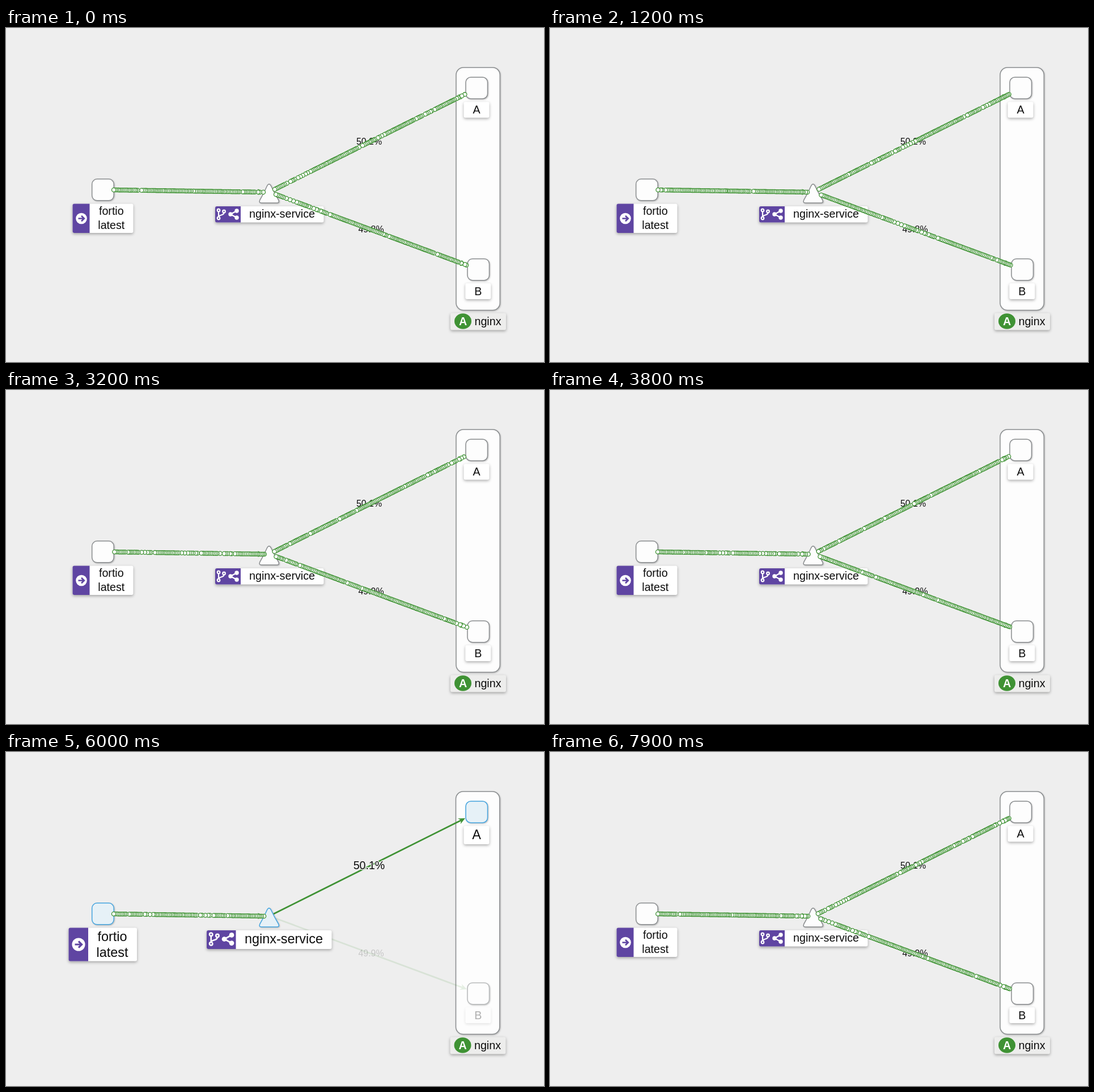
An HTML page that plays this animation: 949 by 590 pixels, repeating every 8000 ms.

```html
<!DOCTYPE html>
<html lang="en">
<head>
<meta charset="utf-8">
<title>Traffic graph</title>
<style>
  html, body { margin: 0; width: 100%; height: 100%; overflow: hidden; background: #eee; }
  svg { display: block; }
  text { font-family: "Liberation Sans", Arial, sans-serif; text-anchor: middle; fill: #0c0c0c; }
  .card { filter: drop-shadow(0 2px 2.5px rgba(0, 0, 0, .32)); }
  .node { filter: drop-shadow(1px 1.5px 1px rgba(0, 0, 0, .25)); stroke-width: 1.5; stroke-linejoin: round; }
  .rate { paint-order: stroke; stroke: #eee; stroke-width: 3px; stroke-linejoin: round; }
  .dot { fill: #fff; stroke: #3f9234; stroke-width: 1.3; }
</style>
</head>
<body>
<svg width="949" height="590" viewBox="0 0 949 590">
  <g id="scene"></g>
  <g id="dots"></g>
</svg>
<script>
const LOOP = 8000, SPEED = 0.1, TRACK = LOOP * SPEED;
const GREEN = '#3f9234', PURPLE = '#5f45a2', GRAY = '#8a8d8f', BLUE = '#45a5e0';
const scene = document.getElementById('scene');
const dotLayer = document.getElementById('dots');

function random(seed) {
  return () => {
    seed = (seed * 1664525 + 1013904223) >>> 0;
    return seed / 4294967296;
  };
}

// Distances between emitted dots: mostly packed, sometimes loose.
function emissions(seed) {
  const rnd = random(seed), list = [];
  let loose = false;
  for (let x = 0; x < TRACK;) {
    list.push(x);
    if (rnd() < 0.13) loose = !loose;
    x += loose && rnd() < 0.4 ? 4 + rnd() * 3.2 : 2.3 + rnd() * 0.8;
    if (loose && rnd() < 0.3) loose = false;
  }
  return list;
}

function makeFlow(seed) {
  const group = document.createElementNS('http://www.w3.org/2000/svg', 'g');
  dotLayer.append(group);
  const offsets = emissions(seed);
  const pool = [];
  for (let i = 0; i < 190; i++) {
    const c = document.createElementNS('http://www.w3.org/2000/svg', 'circle');
    c.setAttribute('class', 'dot');
    c.setAttribute('r', 3.6);
    group.append(c);
    pool.push(c);
  }
  return { group, offsets, pool };
}

const flows = { in: makeFlow(11), A: makeFlow(47), B: makeFlow(83) };

function edges(fresh) {
  return {
    in: [190, 286, 456, 290],
    A: fresh ? [472, 286, 810, 117] : [474, 285, 810, 117],
    B: [476, 294, 813, 419]
  };
}

function drawFlow(flow, [x1, y1, x2, y2], t, shown) {
  flow.group.style.display = shown ? '' : 'none';
  if (!shown) return;
  const dx = x2 - x1, dy = y2 - y1, len = Math.hypot(dx, dy);
  // Newest dots are painted last, on top.
  const places = flow.offsets
    .map(o => (o + SPEED * t) % TRACK)
    .filter(p => p <= len)
    .sort((a, b) => b - a);
  flow.pool.forEach((c, i) => {
    const p = places[i];
    c.style.display = p === undefined ? 'none' : '';
    if (p === undefined) return;
    c.setAttribute('cx', (x1 + dx * p / len).toFixed(2));
    c.setAttribute('cy', (y1 + dy * p / len).toFixed(2));
  });
}

const rect = (x, y, w, h, r, fill, extra = '') =>
  `<rect x="${x}" y="${y}" width="${w}" height="${h}" rx="${r}" fill="${fill}" ${extra}/>`;
const text = (s, x, y, size, extra = '') =>
  `<text x="${x}" y="${y}" font-size="${size}" ${extra}>${s}</text>`;
const fade = (on, amount, body) => `<g opacity="${on ? amount : 1}">${body}</g>`;

function edge([x1, y1, x2, y2], dim) {
  const angle = Math.atan2(y2 - y1, x2 - x1) * 180 / Math.PI;
  const len = Math.hypot(x2 - x1, y2 - y1);
  return fade(dim, 0.12, `<g transform="translate(${x1} ${y1}) rotate(${angle})">
    <path d="M0 0H${len - 5}" stroke="${GREEN}" stroke-width="2.8"/>
    <path d="M${len} 0l-12 -5.5 4 5.5 -4 5.5z" fill="${GREEN}"/></g>`);
}

function look(lit, dim) {
  return `class="node" stroke="${lit ? BLUE : dim ? '#b9bbbc' : GRAY}"`;
}
const tone = lit => lit ? '#e6f1f7' : '#fdfdfd';
const square = (x, y, lit, dim) => rect(x, y, 38.5, 38, 9, tone(lit), look(lit, dim));

function triangle(lit) {
  return `<path d="M460.5 279Q464 272.5 467.5 279Q473.500 292 480.500 303.500Q483 309 478 309H450.500Q445.500 309 448 303.500Q455 292 460.500 279Z"
    fill="${tone(lit)}" ${look(lit)}/>`;
}

const arrowIcon = (x, y, k) => `<g transform="translate(${x} ${y}) scale(${k})">
  <circle r="9.8" fill="#fff"/>
  <path d="M-5.500 0H4M0 -4.800L4.800 0L0 4.800" fill="none" stroke="${PURPLE}" stroke-width="2.700"/></g>`;

const branchIcon = (x, y, k) => `<g transform="translate(${x} ${y}) scale(${k})" fill="none" stroke="#fff" stroke-width="2.200">
  <path d="M-4.500 -5V5M5 -3C5 3 -4 0 -4.500 5"/>
  <circle cx="-4.500" cy="-7" r="2.300"/><circle cx="-4.500" cy="7" r="2.300"/><circle cx="5" cy="-5" r="2.300"/></g>`;

const shareIcon = (x, y, k) => `<g transform="translate(${x} ${y}) scale(${k})" fill="#fff">
  <path d="M5.500 -6L-5.500 0L5.500 6" fill="none" stroke="#fff" stroke-width="2.400"/>
  <circle cx="5.500" cy="-6" r="3.700"/><circle cx="-5.500" r="3.700"/><circle cx="5.500" cy="6" r="3.700"/></g>`;

// White card with a purple badge strip on its left.
function badgeCard(x, y, w, h, strip, body) {
  return `<g class="card">${rect(x, y, w, h, 3, '#fff')}
    <path d="M${x + strip} ${y}H${x + 3}q-3 0 -3 3V${y + h - 3}q0 3 3 3H${x + strip}z" fill="${PURPLE}"/></g>${body}`;
}

function clientLabel(big) {
  return big
    ? badgeCard(110.5, 310.5, 120.5, 59, 34.5, arrowIcon(128, 340, 1.18) +
        text('fortio', 187.5, 334, 23.4) + text('latest', 187.5, 362, 23.4))
    : badgeCard(117.5, 310.5, 107, 51.5, 30, arrowIcon(133, 336.5, 1) +
        text('fortio', 185.8, 330.3, 19.7) + text('latest', 185.8, 355, 19.7));
}

function serviceLabel(big) {
  return big
    ? badgeCard(354, 315, 220.5, 33, 51.5, branchIcon(367, 330.5, 1.18) +
        shareIcon(391.5, 330.5, 1.18) + text('nginx-service', 490, 337.5, 23.4))
    : badgeCard(369, 315, 191.5, 28.5, 45, branchIcon(379.5, 329, 1) +
        shareIcon(401.5, 329, 1) + text('nginx-service', 487, 335, 19.7));
}

function podLabel(name, x, y, big, dim) {
  const h = big ? 32.5 : 28;
  const card = `<g class="card">${rect(x - 22.5, y, 45, h, 3, '#fff')}</g>`;
  return fade(dim, 0.32, card + text(name, x, y + (big ? 23.3 : 20.6), big ? 23.4 : 19.7));
}

function rate(value, x, y, big, dim) {
  return fade(dim, 0.17, text(value, x, y + (big ? 7 : 6), big ? 19.6 : 15.9, 'class="rate"'));
}

function drawScene(hover, fresh) {
  const e = edges(fresh), any = !!hover;
  const a = hover === 'A', b = hover === 'B', dimA = b, dimB = a;
  const grow = b ? 3.5 : 0, shift = a ? -0.5 : 0;
  scene.innerHTML =
    rect(794 + shift, 69.8, 77.3, 428.7 + grow, 13, '#fdfdfd', look(false)) +
    edge(e.in) + edge(e.A, dimA) + edge(e.B, dimB) +
    rate(fresh ? '50.1%' : '50.2%', 640.5, 200, a, dimA) +
    rate(fresh ? '49.9%' : '49.8%', 644, 355, b, dimB) +
    square(151.7, 266.8, any) + triangle(any) +
    square(811, 87, a, dimA) + square(814, 407.7, b, dimB) +
    clientLabel(any) + serviceLabel(any) +
    podLabel('A', 830, 130.5, a, dimA) +
    podLabel('B', 832.8, 451, b, dimB) +
    `<g transform="translate(${shift} ${grow})">
      <g class="card">${rect(784, 503.5, 98, 30, 3, '#ededec')}</g>
      <ellipse cx="806" cy="518" rx="15" ry="13.7" fill="${GREEN}"/>
      ${text('A', 806, 525, 19.7, 'font-weight="bold" style="fill:#fff"')}
      ${text('nginx', 850, 524.7, 19.7)}</g>`;
}

const within = (t, from, to) => t >= from && t < to;
let lastKey = '';

function render(t) {
  const hover = within(t, 1600, 3100) ? 'B' : within(t, 5100, 6600) ? 'A' : '';
  const fresh = t >= 3100;
  const key = hover + fresh;
  if (key !== lastKey) {
    drawScene(hover, fresh);
    lastKey = key;
  }
  const e = edges(fresh);
  for (const id in flows) drawFlow(flows[id], e[id], t, id === 'in' || !hover);
}

function tick() {
  render(performance.now() % LOOP);
  requestAnimationFrame(tick);
}
tick();
</script>
</body>
</html>
```
